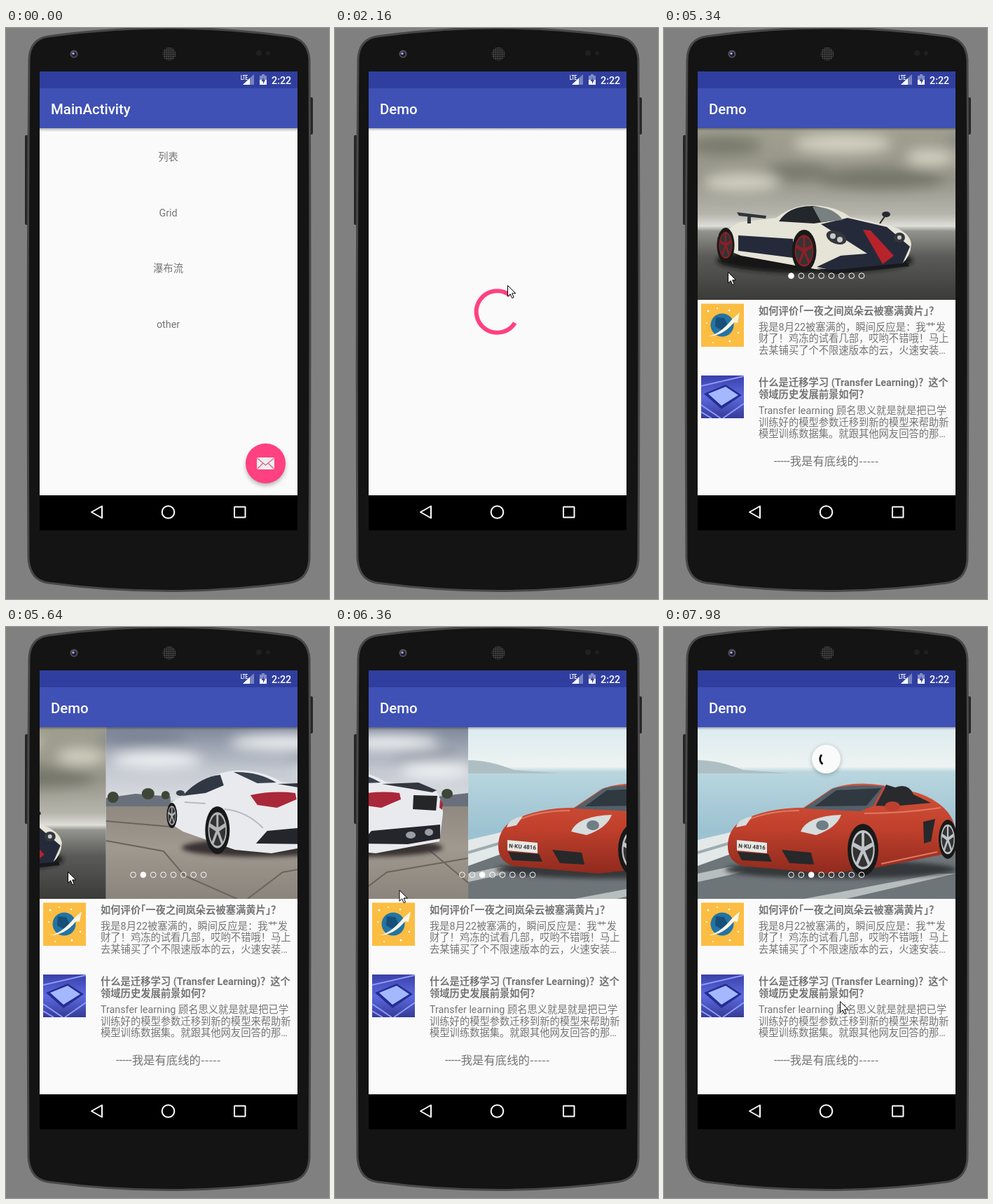
An HTML page that plays this animation: 461 px wide and 815 px high, repeating every 8000 ms.

```html
<!DOCTYPE html>
<html lang="zh-CN">
<head>
<meta charset="utf-8">
<title>Demo</title>
<style>
html, body { margin: 0; width: 100%; height: 100%; overflow: hidden; background: #808080; }
svg { display: block; width: 461px; height: 815px; text-spacing-trim: space-all;
  font-family: Roboto, "Noto Sans CJK SC", "Noto Sans CJK", sans-serif; }
.title { font-size: 20.4px; font-weight: 500; fill: #fff; }
.copy { font-size: 14.3px; fill: #757575; }
.bold { font-weight: 700; }
.mid { text-anchor: middle; }
.half { font-feature-settings: "halt"; }
.cjk { font-family: "Noto Sans CJK SC", "Noto Sans CJK", sans-serif; }
.line { fill: none; stroke: #fff; stroke-width: 2; }
</style>
</head>
<body>
<svg viewBox="0 0 461 815">
<defs>
  <clipPath id="screenClip"><rect x="48" y="62" width="368" height="605"/></clipPath>
  <clipPath id="pagerClip"><rect x="48" y="143" width="368" height="245"/></clipPath>
  <clipPath id="bodyClip"><rect x="48" y="143" width="368" height="524"/></clipPath>
  <clipPath id="chipClip"><rect x="53" y="496" width="61" height="61"/></clipPath>
  <filter id="soft" x="-50%" y="-50%" width="200%" height="200%"><feGaussianBlur stdDeviation="9"/></filter>
  <filter id="shade" x="-50%" y="-50%" width="200%" height="200%"><feGaussianBlur stdDeviation="3"/></filter>
  <linearGradient id="drop" x2="0" y2="1"><stop stop-color="#000" stop-opacity=".28"/><stop offset="1" stop-color="#000" stop-opacity="0"/></linearGradient>
  <linearGradient id="storm" x2="0" y2="1">
    <stop stop-color="#a09f8f"/><stop offset=".3" stop-color="#96958a"/><stop offset=".5" stop-color="#b5b5ac"/>
    <stop offset=".57" stop-color="#deded8"/><stop offset=".6" stop-color="#92928e"/><stop offset=".75" stop-color="#5a5a58"/><stop offset="1" stop-color="#3b3b3a"/>
  </linearGradient>
  <linearGradient id="cloudy" x2="0" y2="1">
    <stop stop-color="#7e8798"/><stop offset=".25" stop-color="#c3c8d0"/><stop offset=".42" stop-color="#d9dce0"/>
    <stop offset=".45" stop-color="#8f8880"/><stop offset=".7" stop-color="#a09990"/><stop offset="1" stop-color="#8b847c"/>
  </linearGradient>
  <linearGradient id="coast" x2="0" y2="1">
    <stop stop-color="#dcebef"/><stop offset=".23" stop-color="#edf3f2"/><stop offset=".26" stop-color="#b9d6df"/>
    <stop offset=".6" stop-color="#9cc2d1"/><stop offset="1" stop-color="#a8c8d2"/>
  </linearGradient>
  <linearGradient id="paint" x2="0" y2="1"><stop stop-color="#d4543c"/><stop offset=".5" stop-color="#c0402c"/><stop offset="1" stop-color="#8f2a1e"/></linearGradient>
  <linearGradient id="chip" x2="0" y2="1"><stop stop-color="#3a3fa8"/><stop offset=".5" stop-color="#5d6be0"/><stop offset="1" stop-color="#353a96"/></linearGradient>
  <pattern id="mesh" width="3" height="3" patternUnits="userSpaceOnUse"><rect width="3" height="3" fill="#1b1b1b"/><circle cx="1.5" cy="1.5" r="1" fill="#555"/></pattern>
  <g id="wheel">
    <circle r="10" fill="#191919"/><circle r="7.6" fill="currentColor"/><circle r="6.6" fill="#333"/>
    <path d="M0 0V-7M0 0L6.6-2.2M0 0L4 5.6M0 0L-4 5.6M0 0L-6.6-2.2" stroke="currentColor" stroke-width="1.7"/>
  </g>
</defs>

<!-- phone -->
<rect width="461" height="815" fill="#808080"/>
<rect x="27" y="153" width="6" height="128" rx="2" fill="#262626"/>
<rect x="432" y="99" width="6" height="53" rx="2" fill="#262626"/>
<path d="M33 45Q34 16 60 12Q232-12 404 12Q431 16 433 45Q435 400 433 757Q432 788 404 792Q232 815 60 792Q34 788 32 757Q30 400 33 45Z" fill="#141414" stroke="#484848" stroke-width="3"/>
<circle cx="97" cy="37" r="5.5" fill="#55555a"/><circle cx="97" cy="37.5" r="3.6" fill="#1c1a35"/><circle cx="96" cy="36.5" r="1.7" fill="#a9a5dc"/>
<circle cx="233" cy="37" r="9.5" fill="url(#mesh)"/>
<circle cx="361" cy="36" r="4" fill="#202020"/><circle cx="374" cy="36" r="3" fill="#202020"/>
<rect x="48" y="62" width="368" height="655"/>
<g class="line">
  <path d="M122 691L137 682.5V699.5Z" stroke-linejoin="round"/><circle cx="231.5" cy="691" r="8.8"/><rect x="326" y="683.5" width="15.5" height="15" rx=".5"/>
</g>

<g clip-path="url(#screenClip)">
  <!-- menu -->
  <rect x="48" y="62" width="368" height="605" fill="#fafafa"/>
  <rect x="48" y="62" width="368" height="24" fill="#303f9f"/>
  <rect x="48" y="86" width="368" height="57" fill="#3f51b5"/>
  <rect x="48" y="143" width="368" height="5" fill="url(#drop)"/>
  <text class="title" x="64" y="122.5">MainActivity</text>
  <g class="copy mid">
    <text x="231.5" y="188.500">列表</text><text x="231.5" y="268.5">Grid</text>
    <text x="231.5" y="348">瀑布流</text><text x="231.5" y="428">other</text>
  </g>
  <circle cx="370.5" cy="625" r="28" opacity=".3" filter="url(#shade)"/>
  <circle cx="370.5" cy="621.5" r="28.5" fill="#ff4081"/>
  <rect x="358" y="613" width="25" height="17" rx="1.500" fill="#eee"/>
  <path d="M358.500 614L370.500 624L382.500 614M358.500 629.500L367 621M382.500 629.500L374 621" fill="none" stroke="#d8608a" stroke-width="1.3"/>

  <!-- feed screen -->
  <g id="demo">
    <rect x="48" y="62" width="368" height="605" fill="#fafafa"/>
    <rect x="48" y="62" width="368" height="24" fill="#303f9f"/>
    <rect x="48" y="86" width="368" height="57" fill="#3f51b5"/>
    <text class="title" x="64" y="122.5">Demo</text>
    <path id="bigSpin" fill="none" stroke="#ff4081" stroke-width="6"/>

    <g id="feed">
      <g clip-path="url(#pagerClip)">
        <g class="page">
          <rect x="48" y="143" width="368" height="245" fill="url(#storm)"/>
          <g filter="url(#soft)">
            <g fill="#65665a" opacity=".65"><ellipse cx="85" cy="168" rx="55" ry="13"/><ellipse cx="310" cy="215" rx="90" ry="15"/><ellipse cx="190" cy="205" rx="45" ry="11"/></g>
            <g fill="#dcdacb" opacity=".85"><ellipse cx="255" cy="165" rx="70" ry="14"/><ellipse cx="110" cy="220" rx="55" ry="13"/><ellipse cx="380" cy="185" rx="35" ry="12"/></g>
          </g>
          <ellipse cx="215" cy="332" rx="140" ry="18" fill="#181818" filter="url(#shade)"/>
          <path d="M77 296L108 277 160 271Q184 252 212 253 245 254 266 270L322 282Q350 290 353 308 352 326 340 336L245 347 215 344 110 325 78 312Z" fill="#e6e3d7"/>
          <path d="M106 296L184 301 184 328 106 318ZM224 280L262 271 318 284 351 312 340 337 246 347 218 341 252 325 290 322Z" fill="#252a3a"/>
          <path d="M164 276Q178 254 212 254 236 256 248 274L214 279Z" fill="#23262b"/>
          <path d="M212 255Q242 255 255 274L224 277Z" fill="#77817f"/>
          <path d="M284 288L295 289 328 325 312 337Z" fill="#b8232b"/>
          <path d="M104 263L146 268 145 272 107 268ZM119 268H124V279H119Z" fill="#30343b"/>
          <path d="M218 343L245 345 348 335 350 340 245 351Z" fill="#17191d"/>
          <ellipse cx="246" cy="299" rx="15" ry="9" transform="rotate(22 246 299)" fill="#34373c"/><ellipse cx="336" cy="299" rx="8" ry="7" fill="#34373c"/>
          <g fill="#c6c9c9"><circle cx="241" cy="297" r="4"/><circle cx="251" cy="302" r="4"/><circle cx="336" cy="299" r="3"/></g>
          <path d="M308 279L315 269" stroke="#222" stroke-width="2"/><ellipse cx="317" cy="266" rx="6" ry="4" fill="#262a33"/>
          <g color="#8b2028"><use href="#wheel" transform="translate(88 310)scale(1.25 2.5)"/><use href="#wheel" transform="translate(200 318)scale(1.75 3)"/></g>
        </g>
        <g class="page">
          <rect x="48" y="143" width="368" height="245" fill="url(#cloudy)"/>
          <g filter="url(#soft)">
            <g fill="#eef0f2"><ellipse cx="120" cy="190" rx="65" ry="12"/><ellipse cx="300" cy="165" rx="75" ry="11"/><ellipse cx="370" cy="205" rx="50" ry="12"/></g>
            <g fill="#687184" opacity=".7"><ellipse cx="100" cy="160" rx="65" ry="8"/><ellipse cx="355" cy="184" rx="50" ry="6"/></g>
          </g>
          <path d="M48 244L90 238 140 242 140 256H48ZM372 242L416 237V256H372Z" fill="#68717b"/>
          <g fill="#3e4638"><circle cx="58" cy="243" r="8"/><ellipse cx="108" cy="238" rx="9" ry="8"/><circle cx="133" cy="240" r="6"/><ellipse cx="386" cy="238" rx="8" ry="7"/></g>
          <path d="M48 305L130 320 160 355 235 388M250 388L300 350 416 330M48 277L140 285M360 318L416 365" fill="none" stroke="#6b645d" stroke-width="2"/>
          <ellipse cx="268" cy="315" rx="112" ry="13" fill="#373330" filter="url(#shade)"/>
          <path d="M137 257Q141 246 163 241 192 208 232 205 268 203 298 221L366 230Q380 245 380 266L375 306 284 323 232 318 158 292 139 280Z" fill="#e9eaee"/>
          <path d="M157 241Q182 214 211 211L216 226 190 237Z" fill="#303844"/><path d="M230 207Q265 206 291 222L264 223Z" fill="#394350"/>
          <path d="M293 224L345 222 371 233 365 236Z" fill="#33363d"/>
          <path d="M254 240Q287 233 318 237L320 246 292 258 264 254ZM376 246L380 252 379 261 375 258Z" fill="#a92738"/>
          <path d="M338 240L372 241 370 262 337 260Z" fill="#252628"/>
          <path d="M278 291L376 282 376 302 330 310 262 309Z" fill="#24262b"/>
          <g fill="#9a9da3"><ellipse cx="334" cy="297" rx="7" ry="5"/><ellipse cx="360" cy="293" rx="6" ry="5"/></g>
          <path d="M217 260Q249 263 272 287M160 250L190 252" fill="none" stroke="#b8bbc2" stroke-width="2"/>
          <ellipse cx="154" cy="237" rx="6" ry="4" fill="#3a404a"/>
          <g color="#b3b5b8"><use href="#wheel" transform="translate(142 269)scale(.75 1.8)"/><use href="#wheel" transform="translate(207 290)scale(1.75 3.4)"/></g>
        </g>
        <g class="page">
          <rect x="48" y="143" width="368" height="245" fill="url(#coast)"/>
          <path d="M48 190Q78 190 113 204L180 209H48Z" fill="#aebfc4"/>
          <path d="M48 332L110 315 416 295V388H48Z" fill="#6e7579"/>
          <path d="M48 304L112 289 112 318 48 341Z" fill="#e3e8e8"/><path d="M48 322L112 303" stroke="#9eabb0" stroke-width="4"/>
          <path d="M48 352L95 342 125 347 48 364ZM200 388L390 352 416 352 260 388Z" fill="#d8dcdc" opacity=".7"/>
          <ellipse cx="252" cy="346" rx="165" ry="13" fill="#34383b" filter="url(#shade)"/>
          <path d="M91 313Q91 291 108 278 145 258 199 258L239 231Q270 219 313 226L324 232Q362 231 389 250 413 266 416 290V320L396 325 300 344 234 352 112 341Q91 334 91 313Z" fill="url(#paint)"/>
          <path d="M200 259L242 230Q276 223 315 228L301 254 280 263Z" fill="#536069"/><path d="M215 256L246 233 310 230 289 255Z" fill="#303840"/>
          <path d="M317 225L330 229Q349 222 356 239L381 251 326 256 301 255Z" fill="#292a2d"/>
          <path d="M315 227L300 256" stroke="#c3473a" stroke-width="3"/>
          <path d="M118 276Q150 262 193 262M286 266Q340 266 395 258M310 338L390 321" fill="none" stroke="#e17961" stroke-width="2"/>
          <path d="M195 292Q203 270 253 268 246 287 217 297ZM103 286Q105 274 126 270L117 283Z" fill="#d7dcdd"/>
          <ellipse cx="226" cy="283" rx="9" ry="7" fill="#6f7d85"/>
          <path d="M105 321L149 324 154 335 111 333ZM168 318L210 322 214 339 179 337ZM370 278L387 274 381 306 371 309Z" fill="#26282a"/>
          <ellipse cx="326" cy="256" rx="11" ry="7" fill="#bc4030"/>
          <path d="M104 304L147 308V323L104 319Z" fill="#e7e9e5"/><text x="106" y="315" font-size="8" font-weight="700" fill="#333" transform="rotate(4 106 315)">N·KU 4816</text>
          <g color="#bfc4c6"><use href="#wheel" transform="translate(284 318)scale(2.2 3.7)"/><use href="#wheel" transform="translate(405 303)scale(1.3 2.8)"/></g>
        </g>
      </g>
      <g id="dots" stroke="#fff" stroke-width="1"></g>

      <rect x="53" y="393.500" width="61" height="61.500" fill="#fbbd42"/>
      <circle cx="83" cy="424" r="16.5" fill="#2274a5"/><path d="M74 413L86 414 91 424 82 431 73 426Z" fill="#174f79"/>
      <path d="M61 440Q78 439 97 416L108 406 105 421 100 420Q83 441 61 440Z" fill="#fff6e4"/>
      <g fill="#fff"><circle cx="63" cy="404" r="1.500"/><circle cx="76" cy="400" r="1"/><circle cx="93" cy="403" r="1.300"/><circle cx="61" cy="421" r="1"/><circle cx="106" cy="435" r="1.300"/><circle cx="94" cy="447" r="1.500"/><circle cx="70" cy="449" r="1"/></g>
      <g clip-path="url(#chipClip)">
        <rect x="53" y="496" width="61" height="61" fill="url(#chip)"/>
        <path d="M53 511L114 497M53 538L81 557M114 536L84 557M53 548L68 557" stroke="#8b9afa" stroke-width="2"/>
        <path d="M57 522L88 509 111 524 82 544Z" fill="#252d92"/><path d="M63 522L88 512 106 524 82 539Z" fill="#a4b8ff"/>
      </g>
      <g class="copy">
        <text class="bold" x="135" y="409">如何评价<tspan class="half cjk">「</tspan>一夜之间岚朵云被塞满黄片<tspan class="half cjk">」</tspan>？</text>
        <text x="135" y="431.500">我是8月22被塞满的，瞬间反应是：我艹发</text>
        <text x="135" y="448">财了！鸡冻的试看几部，哎哟不错哦！马上</text>
        <text x="135" y="465">去某铺买了个不限速版本的云，火速安装…</text>
        <text class="bold" x="135" y="511">什么是迁移学习 (Transfer Learning)？这个</text>
        <text class="bold" x="135" y="527.500">领域历史发展前景如何？</text>
        <text x="135" y="550.500">Transfer learning 顾名思义就是就是把已学</text>
        <text x="135" y="567.500">训练好的模型参数迁移到新的模型来帮助新</text>
        <text x="135" y="584">模型训练数据集。就跟其他网友回答的那…</text>
        <g id="loading">
          <path id="smallSpin" fill="none" stroke="#ff4081" stroke-width="4"/>
          <text x="232.500" y="623">加载中…</text>
        </g>
        <text id="ending" x="157" y="624" font-size="16.4" style="font-size:16.4px">-----我是有底线的<tspan class="cjk">-----</tspan></text>
      </g>
    </g>
    <rect x="48" y="143" width="368" height="4" fill="url(#drop)"/>
    <g clip-path="url(#bodyClip)">
      <g id="refresh">
        <circle cx="231.500" cy="190" r="20.500" opacity=".25" filter="url(#shade)"/>
        <circle cx="231.500" cy="188.500" r="20.500" fill="#fafafa"/>
        <path id="pullSpin" fill="none" stroke="#000" stroke-width="2.600"/>
      </g>
    </g>
  </g>
</g>

<!-- status icons -->
<g fill="#fff">
  <text x="335" y="73.500" font-size="8.500" font-weight="700" textLength="10" lengthAdjust="spacingAndGlyphs">LTE</text>
  <path d="M338 81L354 66V81Z" opacity=".35"/><path d="M338 81L348 71.500V81Z"/>
  <path d="M362 68H365V66H369V68H372V81H362Z" opacity=".4"/><path d="M362 74H372V81H362Z"/>
  <path d="M368 70L364.500 76H367V80L370 74H367.500Z" fill="#303f9f"/>
  <text x="379" y="79.500" font-size="14.300" font-weight="500">2:22</text>
</g>
<path id="cursor" d="M.5 .5V16L4.200 12.700 6.700 18.500 9.200 17.500 6.700 11.800H11.800Z" fill="#fff" stroke="#000" stroke-width="1"/>
</svg>

<script>
const LOOP = 8000, STEP = 60, PAGE_WIDTH = 368;
const el = id => document.getElementById(id);
const clamp = v => Math.max(0, Math.min(1, v));
const smooth = v => { v = clamp(v); return v * v * (3 - 2 * v); };
const between = (t, from, to) => clamp((t - from) / (to - from));
const settle = (t, from, length) => 1 - (1 - between(t, from, from + length)) ** 5;
const show = (id, visible) => el(id).setAttribute('display', visible ? 'inline' : 'none');
const shift = (node, x, y) => node.setAttribute('transform', `translate(${x} ${y})`);

// time, x, y of the pointer tip
const pointer = [
  [60, 434, 87], [480, 232, 180], [720, 232, 180], [960, 160, 150], [1240, 294, 295],
  [1500, 236, 190], [1640, 236, 185], [2160, 246, 367], [2400, 246, 367], [3200, 292, 330],
  [3660, 269, 485], [4020, 262, 540], [4500, 338, 320], [4860, 300, 440], [5000, 290, 520],
  [5340, 91, 348], [6060, 83, 351], [6160, 340, 365], [6320, 90, 375], [6560, 110, 378],
  [6780, 288, 641], [6900, 286, 642], [7080, 255, 400], [7400, 251, 571], [7600, 251, 571],
  [7980, 251, 534]
];

const dots = Array.from({ length: 8 }, (_, i) => {
  const dot = document.createElementNS('http://www.w3.org/2000/svg', 'circle');
  dot.setAttribute('cx', 181.5 + 14.36 * i);
  dot.setAttribute('cy', 353.7);
  dot.setAttribute('r', 3.9);
  return el('dots').appendChild(dot);
});
const pages = document.querySelectorAll('.page');

function pointerAt(t) {
  const next = pointer.findIndex(key => key[0] >= t);
  if (next < 1) return pointer[next < 0 ? pointer.length - 1 : 0].slice(1);
  const a = pointer[next - 1], b = pointer[next], k = smooth(between(t, a[0], b[0]));
  return [a[1] + (b[1] - a[1]) * k, a[2] + (b[2] - a[2]) * k];
}

// Indeterminate ring: the head runs ahead, then the tail catches up, while all rotates.
function spin(id, t, cx, cy, r, origin, angle) {
  const turns = (t - origin) / 1333, whole = Math.floor(turns), u = turns - whole;
  const head = smooth(2 * u), tail = smooth(2 * u - 1);
  const start = angle + 216 * turns + 270 * (whole + tail);
  const sweep = 8 + 268 * (head - tail);
  const point = deg => {
    const a = deg * Math.PI / 180;
    return `${cx + r * Math.cos(a)} ${cy + r * Math.sin(a)}`;
  };
  el(id).setAttribute('d', `M${point(start)}A${r} ${r} 0 ${sweep > 180 ? 1 : 0} 1 ${point(start + sweep)}`);
}

function draw(t) {
  const opening = between(t, 1620, 1920), loaded = t >= 2640;
  show('demo', opening > 0);
  el('demo').setAttribute('opacity', clamp(opening * 1.6));
  shift(el('demo'), 0, 50 * (1 - opening) ** 3);
  show('bigSpin', !loaded);
  show('feed', loaded);
  show('loading', t < 4500);
  show('ending', t >= 4500);
  spin('bigSpin', t, 231.5, 405, 29.8, 1493, -76);
  spin('smallSpin', t, 203, 618, 18.4, 3227, 108);
  spin('pullSpin', t, 231.5, 188.5, 8.8, 7720, 83);

  const scroll = settle(t, 5400, 1010) + settle(t, 6230, 750);
  pages.forEach((page, i) => shift(page, (i - scroll) * PAGE_WIDTH, 0));
  const active = Math.round(scroll);
  dots.forEach((dot, i) => dot.setAttribute('fill', i === active ? '#fff' : 'none'));

  show('refresh', t > 7080);
  const pull = 84 * smooth(between(t, 7080, 7400)) - 16 * smooth(between(t, 7420, 7600));
  shift(el('refresh'), 0, pull - 68);

  show('cursor', t >= 60);
  shift(el('cursor'), ...pointerAt(t));
}

function frame(now) {
  draw(Math.floor(now % LOOP / STEP) * STEP);
  requestAnimationFrame(frame);
}
draw(0);
requestAnimationFrame(frame);
</script>
</body>
</html>
```
